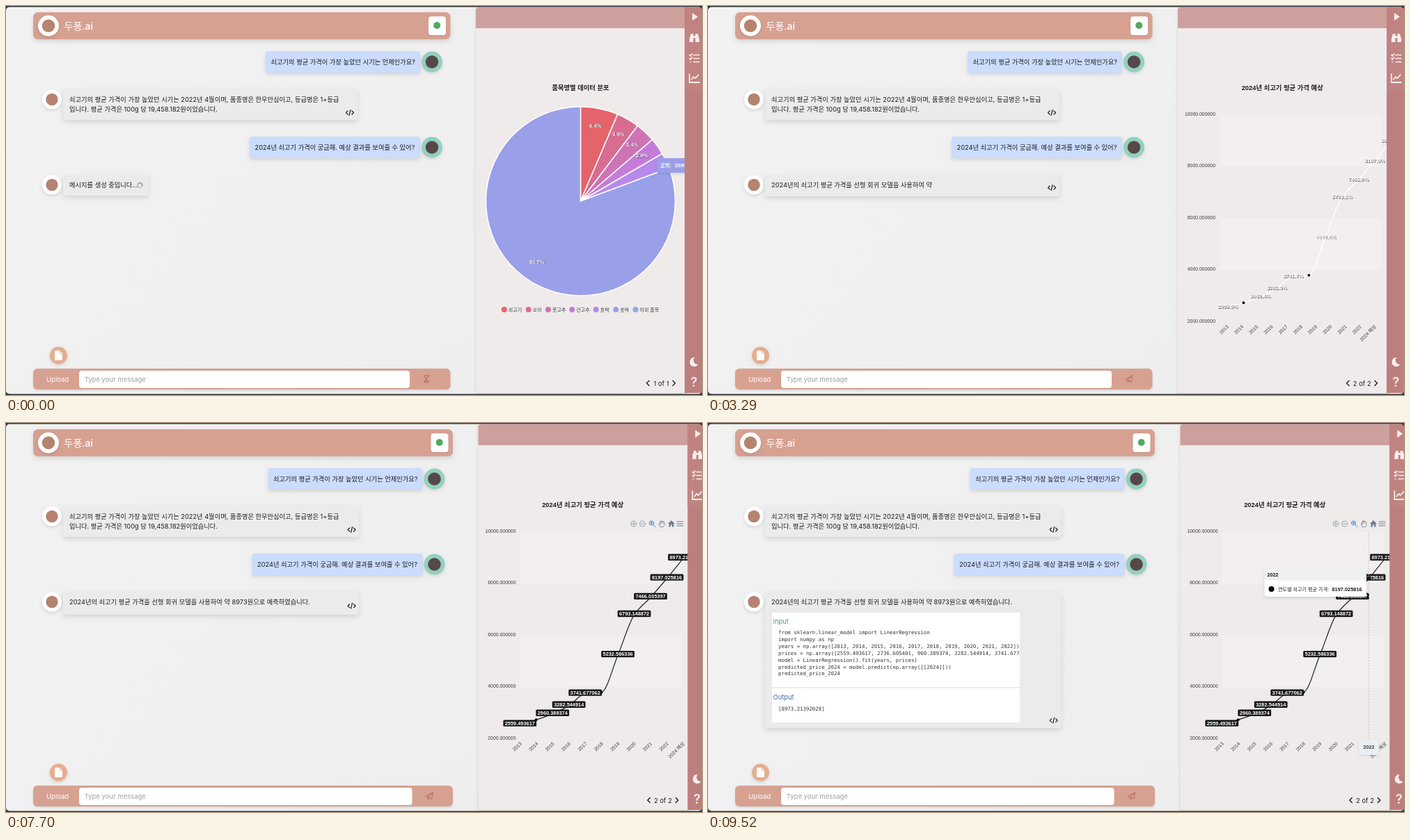
An HTML page with a canvas that plays this animation: 1000x560 px, repeating every 9590 ms.

```html
<!DOCTYPE html>
<html lang="ko">
<head>
<meta charset="utf-8">
<title>Chat with charts</title>
<style>
  html, body { margin: 0; width: 100%; height: 100%; overflow: hidden; background: #35363a; }
  canvas { display: block; width: 1000px; height: 560px; }
</style>
</head>
<body>
<canvas id="stage"></canvas>
<script>
const LOOP = 9590;
const LOADED = 2310, CHART = 2660, PAUSE = 3290, RESUME = 3990, EXPAND = 7665, HOVER = 8680;
const UI = 'Inter, "Noto Sans CJK KR", sans-serif';
const PLAIN = '"Liberation Sans", "Noto Sans CJK KR", sans-serif';
const MONO = '"DejaVu Sans Mono", monospace';
const ROSE = '#d7a192', WHITE = '#fff', INK = '#1c1c1e';

const canvas = document.getElementById('stage');
const ratio = window.devicePixelRatio || 1;
canvas.width = 1000 * ratio;
canvas.height = 560 * ratio;
const ctx = canvas.getContext('2d');

const clamp = (v) => Math.max(0, Math.min(1, v));
const span = (t, from, to) => clamp((t - from) / (to - from));
const mix = (a, b, p) => a + (b - a) * p;
const easeOut = (p) => 1 - (1 - p) ** 3;
const easeInOut = (p) => p < .5 ? 2 * p * p : 1 - 2 * (1 - p) ** 2;

function layer(draw, { x = 0, y = 0, alpha = 1, clip } = {}) {
  ctx.save();
  ctx.globalAlpha *= alpha;
  if (clip) {
    ctx.beginPath();
    ctx.rect(...clip);
    ctx.clip();
  }
  ctx.translate(x, y);
  draw();
  ctx.restore();
}

function shade(blur) {
  ctx.shadowColor = blur ? 'rgba(0,0,0,.12)' : 'transparent';
  ctx.shadowBlur = blur * ratio;
  ctx.shadowOffsetY = blur * ratio / 2;
}

function box(x, y, w, h, r, fill, blur = 0) {
  shade(blur);
  ctx.fillStyle = fill;
  ctx.beginPath();
  ctx.roundRect(x, y, w, h, r);
  ctx.fill();
  shade(0);
}

function dot(x, y, r, fill, blur = 0) {
  box(x - r, y - r, 2 * r, 2 * r, r, fill, blur);
}

function text(str, x, y, size, fill, { font = UI, weight = 400, align = 'left' } = {}) {
  ctx.font = `${weight} ${size}px ${font}`;
  ctx.textAlign = align;
  ctx.fillStyle = fill;
  ctx.fillText(str, x, y);
}

function shadowText(str, x, y, size) {
  const style = { font: PLAIN, weight: 700, align: 'center' };
  text(str, x + .8, y + .9, size, 'rgba(30,30,30,.7)', style);
  text(str, x, y, size, WHITE, style);
}

// Icon paths are drawn around their own centre.
function icon(d, x, y, color, width = 0) {
  layer(() => {
    const path = new Path2D(d);
    ctx.strokeStyle = ctx.fillStyle = color;
    ctx.lineWidth = width;
    ctx.lineCap = ctx.lineJoin = 'round';
    if (width) ctx.stroke(path); else ctx.fill(path);
  }, { x, y });
}

/* ---------- chat ---------- */

const avatar = (x, y, r, back, mark) => {
  dot(x, y, r, back, 4);
  dot(x, y, r * .62, mark);
};
const botAvatar = (x, y, r) => avatar(x, y, r, WHITE, '#b5836f');

function userMessage(str, left, y, shift) {
  box(left + shift, y, 595 - left, 31, 4, '#cbdcfd', 5);
  text(str, left + 7.5 + shift, y + 18.5, 9.25, INK);
  avatar(612 + shift, y + 15.5, 15, '#93d0c0', '#574848');
}

const codeIcon = (x, y) => icon('M-3-2.5L-5.5 0L-3 2.5M3-2.5L5.5 0L3 2.5M1-4L-1 4', x, y, INK, 1.2);

const CODE = [
  'from sklearn.linear_model import LinearRegression',
  'import numpy as np',
  'years = np.array([2013, 2014, 2015, 2016, 2017, 2018, 2019, 2020, 2021, 2022])',
  'prices = np.array([2559.493617, 2736.605401, 960.389374, 3282.544914, 3741.677062])',
  'model = LinearRegression().fit(years, prices)',
  'predicted_price_2024 = model.predict(np.array([[2024]]))',
  'predicted_price_2024',
];

function codeBlock() {
  const mono = { font: MONO };
  box(92, 273, 356, 158, 0, WHITE);
  box(92, 380.5, 356, 1, 0, '#dcdcdc');
  text('Input', 93.5, 288.5, 9.4, '#4b9a76');
  CODE.forEach((line, i) => text(line, 101, 304.3 + i * 9.85, 7.39, '#333', mono));
  text('Output', 93.5, 397.5, 9.4, '#4369ae');
  text('[8973.21392028]', 101, 413.5, 7.39, '#333', mono);
}

function spinner(t) {
  layer(() => {
    ctx.rotate(t / 1000 * 2 * Math.PI);
    for (let i = 0; i < 8; i++) {
      ctx.rotate(Math.PI / 4);
      box(2.2, -.5, 2.2, 1, .5, `rgba(20,20,20,${.3 + i * .1})`);
    }
  }, { x: 192.5, y: 258 });
}

const ANSWER = '2024년의 쇠고기 평균 가격을 선형 회귀 모델을 사용하여 약 8973원으로 예측하였습니다.';
const FIRST_PART = ANSWER.indexOf(' 8973');

function answer(t, shift) {
  botAvatar(66, 257.5, 14);
  if (t < LOADED) {
    box(82, 243, 123, 30, 4, '#ebebeb', 6);
    text('메시지를 생성 중입니다...', 91, 261, 9.25, INK);
    spinner(t);
    return;
  }
  const open = 165 * easeInOut(span(t, EXPAND, EXPAND + 500));
  const count = t < RESUME
    ? Math.ceil(FIRST_PART * span(t, LOADED, PAUSE - 30))
    : FIRST_PART + Math.floor((t - RESUME) / 30);
  const height = 31 + open;
  box(82, 243, 423 + shift * .7, height, 4, '#ebebeb', 6);
  text(ANSWER.slice(0, count), 91, 261, 9.25, INK);
  if (open) layer(codeBlock, { clip: [92, 270, 356, open + 1] });
  codeIcon(494 + shift * .75, 261.5 + open * 1.01);
}

function chat(t, shift) {
  box(39, 9, 599.5 + shift, 39, 7, ROSE, 6);
  botAvatar(61, 28.5, 15);
  text('두퐁.ai', 83.5, 33.5, 14, WHITE, { weight: 500 });
  box(607 + shift, 15, 25, 27, 4, WHITE, 2);
  dot(619.2 + shift, 28, 5, '#51a960');

  userMessage('쇠고기의 평균 가격이 가장 높았던 시기는 언제인가요?', 373, 65, shift);
  botAvatar(66, 134.5, 14);
  box(82, 119, 423 + shift * .7, 45, 4, '#ebebeb', 6);
  text('쇠고기의 평균 가격이 가장 높았던 시기는 2022년 4월이며, 품종명은 한우안심이고, 등급명은 1+등급', 91, 137.5, 9.25, INK);
  text('입니다. 평균 가격은 100g 당 19,458.182원이었습니다.', 91, 152.3, 9.25, INK);
  codeIcon(494 + shift * .75, 153.5);
  userMessage('2024년 쇠고기 가격이 궁금해. 예상 결과를 보여줄 수 있어?', 350, 188, shift);
  answer(t, shift);

  dot(75.5, 503, 12.5, '#e6ad91', 4);
  icon('M-5-7H1.5L5.5-3V5.5Q5.5 7 4 7H-4Q-5.5 7-5.5 5.5V-5.5Q-5.5-7-4-7Z', 75.5, 503, WHITE);
  icon('M1.5-7V-3H5.5', 75.5, 503, '#e6ad91', .8);

  box(39, 522, 599.5 + shift, 30, 6, ROSE, 3);
  text('Upload', 58, 540.8, 9.5, WHITE);
  box(105, 525, 475 + shift, 25, 4, WHITE);
  text('Type your message', 112.7, 540.7, 9.5, '#a0a0a0');
  if (t < LOADED) {
    icon('M-4-5H4M-4 5H4M-3-5C-3-2 0-1 0 0C0 1-3 2-3 5M3-5C3-2 0-1 0 0C0 1 3 2 3 5M-1.5 3.5H1.5', 604, 537, '#b3716b', 1.2);
  } else {
    icon('M5-5L-5 .5L-1.5 2L3.5 4ZM5-5L-1.5 2V5L.5 3', 604.5 + shift, 537, '#b06c66', 1);
  }
}

/* ---------- pie ---------- */

const SLICES = [
  ['쇠고기', 6.4, '#e5646c'], ['오이', 3.9, '#d96c93'], ['풋고추', 3.4, '#ce74b5'], ['건고추', 2.9, '#c47cd8'],
  ['호박', 2.7, '#b68aea'], ['호박', 80.7, '#9a9fe9'], ['이외 품목', 0, '#8aaee9'],
];
const SLICE_LABELS = [[847, 174.5], [880, 186.5], [900, 201.5], [914, 217.7], null, [763, 370.5]];
const LEGEND_X = [715.8, 750.7, 779, 813.3, 847.7, 876.3, 904.5];
// Slices under the pointer on its way up, with their totals.
const HOVERED = [[5, '20956'], [4, '702'], [3, '753'], [2, '883'], [1, '1082']];

function pie(t) {
  text('품목명별 데이터 분포', 825.5, 120.7, 9.3, INK, { font: PLAIN, weight: 700, align: 'center' });
  let start = -Math.PI / 2;
  SLICES.forEach(([name, share, color], i) => {
    const end = start + share / 100 * 2 * Math.PI;
    if (share) {
      ctx.beginPath();
      ctx.moveTo(825.5, 281);
      ctx.arc(825.5, 281, 136, start, end);
      ctx.closePath();
      ctx.fillStyle = color;
      ctx.fill();
      ctx.strokeStyle = WHITE;
      ctx.lineWidth = 1.5;
      ctx.stroke();
    }
    start = end;
    dot(LEGEND_X[i], 437, 4, color);
    text(name, LEGEND_X[i] + 6, 439.5, 7, '#373d3f', { font: PLAIN });
  });
  SLICE_LABELS.forEach((at, i) => at && shadowText(SLICES[i][1] + '%', ...at, 7.6));

  const p = easeInOut(span(t, 300, 1750));
  const [index, total] = HOVERED[Math.min(4, Math.floor(p * 5))];
  layer(() => {
    box(0, 0, index === 5 ? 54 : 48, 21, 2, SLICES[index][2], 3);
    const bold = { font: PLAIN, weight: 700 };
    text(SLICES[index][0] + ':', 5, 12.5, 7.4, WHITE, bold);
    text(total, 26, 12.5, 7.4, WHITE, bold);
  }, { x: mix(935, 864, p), y: mix(219, 132, p), alpha: 1 - span(t, 1840, 2010) });
}

/* ---------- line chart ---------- */

const PRICES = [2559.493617, 2736.605401, 2960.389374, 3282.544914, 3741.677062, 3799,
  5232.586336, 6793.148872, 7466.035397, 8197.025816, 8973.21392];
const UNLABELLED = [1, 5];
const BASE = 454.6, LABEL_LIFT = 1.6;
const yearName = (i) => i < 10 ? String(2013 + i) : '2024 예상';
const priceY = (v) => BASE - (v - 2000) * .03725;

function smoothLine(points) {
  const slope = points.slice(1).map(([x, y], i) => (y - points[i][1]) / (x - points[i][0]));
  const tangent = points.map((_, i) => {
    const a = slope[i - 1] ?? slope[i], b = slope[i] ?? a;
    return a + b ? 2 * a * b / (a + b) : 0;
  });
  ctx.beginPath();
  ctx.moveTo(...points[0]);
  for (let i = 1; i < points.length; i++) {
    const [x0, y0] = points[i - 1], [x1, y1] = points[i], third = (x1 - x0) / 3;
    ctx.bezierCurveTo(x0 + third, y0 + tangent[i - 1] * third, x1 - third, y1 - tangent[i] * third, x1, y1);
  }
  ctx.stroke();
}

function toolbar() {
  const grey = '#6e8192', ring = 'M4 0A4 4 0 1 1-4 0A4 4 0 1 1 4 0';
  icon(ring + 'M-2 0H2M0-2V2', 902, 145, grey, .7);
  icon(ring + 'M-2 0H2', 914.5, 145, grey, .7);
  icon('M2-1A3 3 0 1 1-4-1A3 3 0 1 1 2-1M1.2 1.2L4.5 4.5M-2.4-1H.4M-1-2.4V.4', 928.5, 145, '#2f8be0', 1);
  icon('M-2 4L-4 0L-2 1V-3M-2-1V-3.5L0-4V-1M0-4L2-3.5V-1M2-3L4-2V2L2.5 4.5H-2', 942, 145, grey, .8);
  icon('M-5 0L0-5L5 0H3.5V4.5H1V1.5H-1V4.5H-3.5V0Z', 956, 145, grey);
  icon('M-4.5-3H4.5M-4.5 0H4.5M-4.5 3H4.5', 968.5, 145, grey, 1);
}

function lineTooltip(t, points) {
  const p = span(t, 8750, 9450);
  const index = 1 + Math.round(8 * p);
  const [px, py] = points[index];
  const bold = { font: PLAIN, weight: 700 };
  layer(() => {
    ctx.strokeStyle = '#b6b6b6';
    ctx.lineWidth = .7;
    ctx.setLineDash([2, 2]);
    ctx.beginPath();
    ctx.moveTo(px, 157);
    ctx.lineTo(px, BASE);
    ctx.stroke();
    ctx.setLineDash([]);
    dot(px, py, 3.2, INK);
    box(px - 14.5, 455.5, 29, 22.5, 2, '#eceff1', 2);
    text(yearName(index), px, 469, 7.2, '#373d3f', { ...bold, align: 'center' });
    layer(() => {
      box(0, 0, 146.5, 41, 3, WHITE, 4);
      box(0, 0, 146.5, 17.5, [3, 3, 0, 0], '#eff0f1');
      text(yearName(index), 4, 11.5, 7.2, INK, { font: PLAIN, weight: 600 });
      dot(10, 30, 4, '#000');
      text('연도별 쇠고기 평균 가격:', 19.5, 32.6, 7.1, INK, { font: PLAIN, weight: 500 });
      text(PRICES[index], 97, 32.6, 7.4, INK, bold);
    }, { x: mix(736, 799.5, p), y: mix(241, 209, p) });
  }, { alpha: span(t, HOVER - 70, HOVER + 60) });
}

function lineChart(t, shift) {
  const final = t >= RESUME;
  const settle = easeOut(span(t, RESUME, RESUME + 350));
  const rise = easeOut(span(t, CHART, CHART + 520));
  const points = PRICES.map((v, i) => [
    mix(746, 738.3, settle) + i * 23.47,
    mix(BASE, priceY(v), rise),
  ]);
  const bold = { font: PLAIN, weight: 700, align: 'center' };
  text('2024년 쇠고기 평균 가격 예상', 825.2 + shift, 120.9, 9.35, INK, bold);

  for (const y of [BASE - 298, BASE - 149]) box(735 + shift, y, 232, 74.5, 0, 'rgba(246,243,243,.5)');
  for (let i = 0; i < 5; i++) {
    text((10000 - i * 2000).toFixed(6), 729 + shift, 157.5 + i * 74.5, 6.9, '#373d3f', { font: PLAIN, align: 'right' });
  }
  PRICES.forEach((_, i) => layer(() => {
    ctx.rotate(-Math.PI / 4);
    text(yearName(i), 0, 0, 6.9, '#373d3f', { font: PLAIN, align: 'right' });
  }, { x: mix(748.5, 741.5, settle) + i * mix(21.2, 23.4, settle), y: 462 }));

  ctx.strokeStyle = final ? '#2a2a2a' : WHITE;
  ctx.lineWidth = 1.3;
  smoothLine(points);
  for (const i of UNLABELLED) dot(...points[i], 1.9, '#000');

  if (rise === 1) points.forEach(([x, y], i) => {
    if (UNLABELLED.includes(i)) return;
    const middle = y - LABEL_LIFT;
    if (final) {
      ctx.font = `700 7.4px ${PLAIN}`;
      const width = ctx.measureText(PRICES[i]).width + 4.6;
      box(x - width / 2, middle - 4.7, width, 9.4, 1.5, '#161616');
      text(PRICES[i], x, middle + 2.6, 7.4, WHITE, bold);
    } else {
      shadowText(PRICES[i].toFixed(1) + '%', x + .8, middle + 3, 7.4);
    }
  });
  if (final) toolbar();
  if (t >= HOVER) lineTooltip(t, points);
}

/* ---------- panel and sidebar ---------- */

function panel(t, shift, edgeShift) {
  const left = 675 + shift;
  box(left, 2, 305, 555, 4, '#efebea', 4);
  box(left, 2, 305, 30, [4, 0, 0, 0], '#cda09e');
  const second = t >= CHART;
  if (second) lineChart(t, shift); else pie(t);
  text(second ? '2 of 2' : '1 of 1', (second ? 939.7 : 941.5) + edgeShift, 546.5, 9.4, INK, { align: 'center' });
  icon('M2-3.5L-1.5 0L2 3.5', (second ? 919 : 922) + edgeShift, 543, INK, 1.4);
  icon('M-2-3.5L1.5 0L-2 3.5', 960 + edgeShift, 543, INK, 1.4);
}

function sidebar(shift) {
  const x = 989 + shift, light = '#f8eeec';
  box(975 + shift, 2, 30, 555, 0, '#bc7f7e');
  box(975 + shift, 2, 30, 120, 0, '#c18382');
  icon('M-3-5.5L5 0L-3 5.5Z', x, 15.5, light);
  icon('M-5-6H-1.5V-3H1.5V-6H5L7 1V6H1.5V0H-1.5V6H-7V1Z', x, 46, light);
  icon('M-7-4.5L-5.5-3L-3.5-6M-7 .5L-5.5 2L-3.5-1M-1-4.5H7M-1 .5H7M-1 5.5H7M-6 5.5H-5.5', x, 75, light, 1.7);
  icon('M-7-6V6H7M-4 1.5L-1-2L1.5 0L6-5', x, 104, light, 1.8);
  icon('M1-6.5A6.5 6.5 0 1 0 6 3.5A6 6 0 0 1 1-6.5Z', x - .5, 512.5, light);
  text('?', x - .5, 548, 18, light, { weight: 600, align: 'center' });
}

function render(t) {
  const moved = t >= RESUME;
  const shift = moved ? 3.5 : 0, edgeShift = moved ? 4.3 : 0;
  ctx.setTransform(ratio, 0, 0, ratio, 0, 0);
  box(0, 0, 1000, 560, 0, '#35363a');
  const back = ctx.createLinearGradient(0, 0, 675, 560);
  back.addColorStop(0, '#f2f2f2');
  back.addColorStop(1, '#eeeeee');
  ctx.save();
  ctx.beginPath();
  ctx.roundRect(0, 1.5, 1000, 557, 5);
  ctx.clip();
  box(0, 0, 1000, 560, 0, back);
  chat(t, shift);
  panel(t, shift, edgeShift);
  sidebar(edgeShift);
  ctx.restore();
}

const begin = performance.now();
function tick() {
  render((performance.now() - begin) % LOOP);
  requestAnimationFrame(tick);
}
tick();
</script>
</body>
</html>
```
